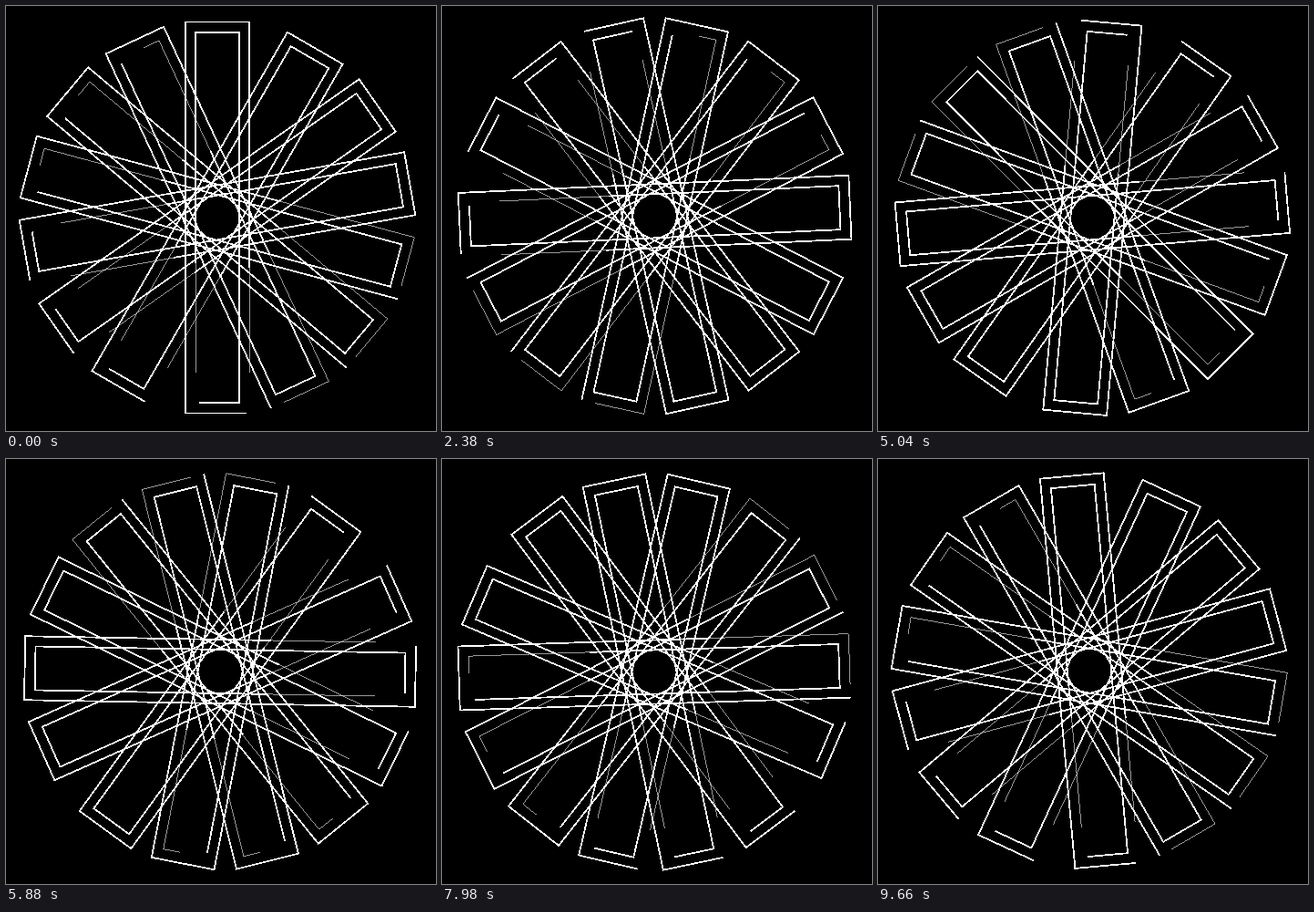
An HTML page that plays this animation: 472 by 466 pixels, repeating every 9800 ms.

```html
<!DOCTYPE html>
<html>
<head>
<meta charset="utf-8">
<style>
  html, body { margin: 0; width: 100%; height: 100%; overflow: hidden; background: #000; }
  svg { display: block; }
  path { fill: none; stroke: #fff; shape-rendering: crispEdges; }
  .bold { stroke-width: 1.8; }
  .thin { stroke-width: .6; }
</style>
</head>
<body>
<svg width="472" height="466" viewBox="0 0 472 466"><g id="wheel"></g></svg>
<script>
const STEP = 140, STEPS = 70;
const wheel = document.getElementById('wheel');

// Double frames whose strokes fade out on different sides.
const early = {
  bold: 'M35 55V-214.5H-35V214.5H32 M-24 50V-203H24V203H-20',
  thin: 'M35 55V170 M-24 50V170'
};
const late = {
  bold: 'M-35 -60V214.5H35V-214.5 M-24 70V-203H24V198',
  thin: 'M-35 -60V-214.5H20 M-24 70V203H-5'
};

const path = (shape, kind, angle) =>
  `<path class="${kind}" d="${shape[kind]}" transform="rotate(${angle})"/>`;

wheel.innerHTML = [0, 30, 55, 80, 105, 130, 155].map(angle => {
  const shape = angle < 100 ? early : late;
  return path(shape, 'bold', angle) + path(shape, 'thin', angle);
}).join('');

function draw() {
  const step = Math.floor(performance.now() / STEP) % STEPS;
  // The hub sits slightly off the pivot, so the wheel wobbles.
  wheel.setAttribute('transform',
    `translate(233.7 232) rotate(${step * 360 / STEPS}) translate(-1.7 0)`);
  requestAnimationFrame(draw);
}
draw();
</script>
</body>
</html>
```
